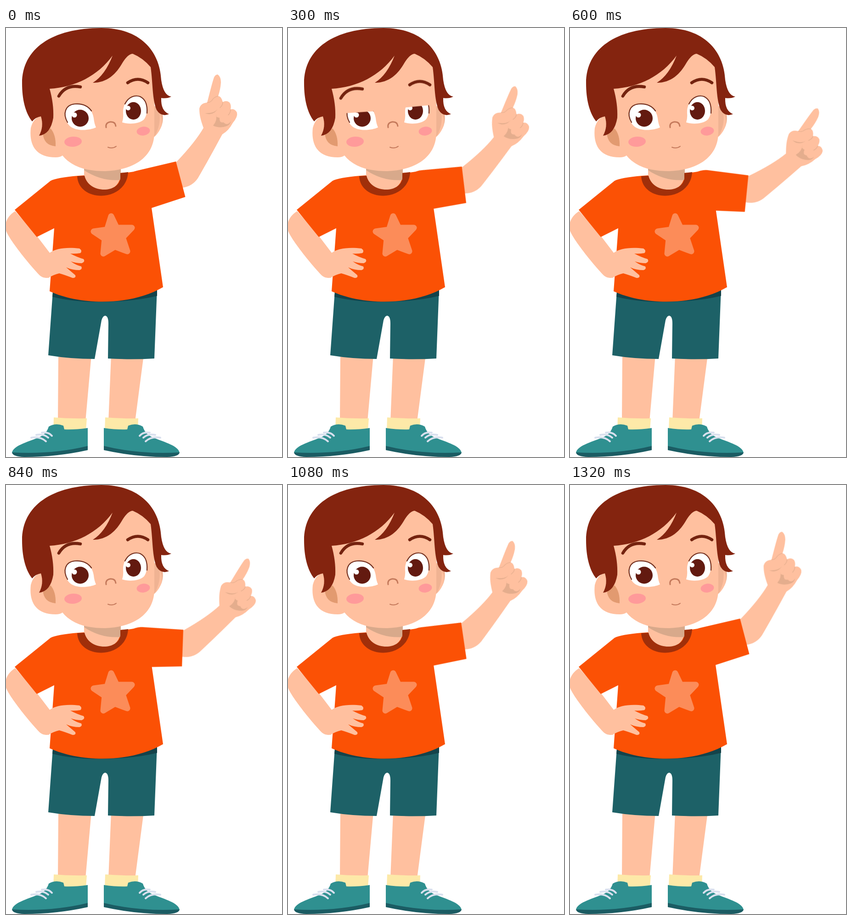
Recreate the animation shown at these times as an HTML page without scripts. Size 601 by 932 pixels, loop 1350 ms.

```html
<!DOCTYPE html>
<html lang="en">
<head>
<meta charset="utf-8">
<title>Pointing boy</title>
<style>
  html, body { margin: 0; width: 100%; height: 100%; overflow: hidden; background: #fff; }
  svg { display: block; width: 100%; height: 100%; }
  .skin { fill: #ffc09f; }
  .shade { fill: #e4ad8d; }
  .shirt { fill: #fb5105; }
  .hair { fill: #84240f; }
  .iris { fill: #631a10; }
  .white { fill: #fff; }
  .cheek { fill: #ff9a9a; }
  .line { fill: none; stroke-linecap: round; }
  .lash { stroke: #74301f; stroke-width: 2.2; }
  .brow { stroke: #74230f; stroke-width: 6.5; }
  .feature { stroke: #c4795b; }

  .arm { transform-origin: 296px 356px; animation: swing 675ms linear infinite alternate; }
  .lid { animation: blink 1350ms linear infinite; --travel: -60px; }
  .brows { animation: frown 1350ms linear infinite; }

  @keyframes swing {
    0% { transform: rotate(0deg); }
    11.1% { transform: rotate(.5deg); }
    22.2% { transform: rotate(2deg); }
    33.3% { transform: rotate(4.5deg); }
    44.4% { transform: rotate(8deg); }
    62.2% { transform: rotate(13deg); }
    75.6% { transform: rotate(17deg); }
    88.9% { transform: rotate(20.5deg); }
    94.4% { transform: rotate(21.4deg); }
    100% { transform: rotate(21.7deg); }
  }
  @keyframes blink {
    0%, 16.7%, 40%, 100% { transform: translateY(var(--travel)); }
    30.5%, 31.5% { transform: translateY(0); }
  }
  @keyframes frown {
    0%, 16.7%, 40%, 100% { transform: translateY(0); }
    30.5%, 31.5% { transform: translateY(11px); }
  }
</style>
</head>
<body>
<svg viewBox="0 0 601 932" preserveAspectRatio="none">
  <defs>
    <g id="shoe">
      <path fill="#2f9090" d="M93 866Q108 857 125 864L127 872Q150 873 178 869V912Q100 932 13 923C15 908 45 900 70 890Q88 883 93 866Z"/>
      <path fill="#1b5c63" d="M13 922Q100 927 178 908V917Q110 932 40 932Q14 931 13 922Z"/>
      <path class="line" stroke="#d9e0ee" stroke-width="4" d="M55 890Q75 887 87 898M66 884Q82 881 92 890M78 879Q93 877 100 886"/>
    </g>
  </defs>

  <!-- legs -->
  <path class="skin" d="M114 710H186L173 855H113ZM229 710H300L281 855H223Z"/>
  <path fill="#fde9a8" d="M104 846Q140 849 176 848L174 874H103ZM216 846Q252 849 288 848L287 874H215Z"/>
  <use href="#shoe"/>
  <use href="#shoe" transform="translate(391) scale(-1 1)"/>
  <path fill="#1d6167" d="M102 572L92 711Q140 719 193 719L208 635Q211 625 216 625Q223 626 223 642L222 718Q272 721 323 718L329 565Z"/>
  <path fill="#14434a" d="M102 574L101 584Q150 596 210 595Q280 594 329 582V568Z"/>

  <!-- raised arm -->
  <g class="arm">
    <path class="skin" d="M365 294L372 290Q412 248 430 217C424 200 421 190 421 175Q424 163 438 162C442 147 448 122 453 107Q456 101 461 101Q468 106 468 118Q467 133 462 148Q469 148 472 161Q480 156 487 162Q491 168 489 177Q498 174 503 184Q505 193 494 206Q485 223 471 231C453 264 435 297 418 326Q406 344 384 347Z"/>
    <path class="shade" d="M457 188Q461 200 451 212Q465 219 481 213Q488 210 490 202Q482 214 474 205Q464 207 465 195Q456 194 457 188ZM433 185Q450 192 461 176Q453 186 433 185Z"/>
    <path class="line" stroke="#e4ad8d" stroke-width="1.2" d="M438 162Q446 162 450 155Q455 149 462 148M472 161Q472 168 466 173M489 177Q489 184 484 189"/>
    <path class="shirt" d="M370 290L285 310A47.5 47.5 0 0 0 252 338L280 402L317 391L390.500 367Z"/>
  </g>

  <!-- shirt and resting arm -->
  <path class="skin" d="M20 398C2 409-4 425 0 440C6 459 53 517 74 538Q83 545 94 542L104 500L62 445Z"/>
  <path class="shirt" d="M157 321Q110 325 97 332L19 395L67 454L105 435L95 572C160 602 270 605 342 563L317 391L300 309L265 314Z"/>
  <path class="skin" d="M66 453L93 490C108 478 133 476 160 479Q167 484 162 489Q150 491 140 490Q155 498 169 502Q173 508 165 511Q152 511 141 507Q152 515 164 518Q167 524 160 526Q144 526 131 520L151 537Q153 543 145 543Q127 536 116 533Q103 536 92 543L70 530Z"/>
  <path class="skin" d="M170 295H250V322Q243 353 210 353Q176 352 170 320Z"/>
  <path fill="#d8a98b" d="M170 300H250V330Q208 334 170 309Z"/>
  <path fill="#a02f0a" d="M155 322C158 380 262 380 266 313L249 315V327C244 360 180 360 171 321Z"/>
  <path fill="#fc8c59" stroke="#fc8c59" stroke-width="13" stroke-linejoin="round" d="M229 409L241 434L274 434L254 455L264 485L237 475L212 490L215 458L191 442L220 438Z"/>

  <!-- head -->
  <path fill="#f0b393" d="M318 165L340 182Q348 213 321 238Z"/>
  <path class="skin" d="M334 184Q349 211 323 237Q338 210 334 184Z"/>
  <path class="skin" d="M80 190Q60 193 54 217C50 252 63 281 108 281Q118 281 123 277C145 304 180 311 216 311C278 309 324 280 323 225V80L270 40H200L85 110Z"/>
  <path fill="#e29a70" d="M80 228Q82 255 108 257Q109 232 97 218Z"/>
  <ellipse class="cheek" cx="146" cy="247" rx="19" ry="11" transform="rotate(-4 146 247)"/>
  <ellipse class="cheek" cx="299" cy="224" rx="14.500" ry="9.500" transform="rotate(-8 299 224)"/>
  <path class="line feature" stroke-width="3" d="M218 216Q216 206 227 204Q238 203 239 213"/>
  <path class="line feature" stroke-width="2" d="M222 259Q232 263 240 257"/>

  <!-- eyes -->
  <path class="white" d="M196 216C183 222 152 226 138 212C124 197 124 172 146 165C172 160 188 176 191 196Q192 207 196 216Z"/>
  <circle class="iris" cx="161.500" cy="196" r="18.500"/>
  <circle class="white" cx="149" cy="189" r="5.500"/>
  <path class="line lash" d="M134 205C123 186 129 167 150 165Q174 163 186 180"/>
  <path class="white" d="M253 205C263 209 290 210 301 198C311 184 309 153 288 148C267 147 254 165 255 185Q256 196 253 205Z"/>
  <ellipse class="iris" cx="277.500" cy="180" rx="16.500" ry="19"/>
  <circle class="white" cx="266" cy="174" r="5"/>
  <path class="line lash" d="M259 165C267 149 281 145 292 149Q309 157 307 185"/>
  <path class="skin lid" d="M122 152H201V215.500L122 221Z"/>
  <path class="skin lid" d="M249 144H311V203L249 209Z"/>

  <path class="hair" d="M72 234Q83 214 76 192Q64 194 57 203C42 184 35 155 35 120C35 45 100 0 208 0C290 0 335 48 338 113Q343 147 360 149Q351 154 338 152Q337 180 355 187Q338 194 328 178C318 154 320 120 315 85Q298 65 276 56Q266 56 254 75C240 100 220 119 189 119Q216 102 232 60C200 104 150 129 95 132C101 153 104 175 103 195Q97 231 72 234Z"/>
  <g class="brows line brow">
    <path d="M115 148Q130 122 162 128"/>
    <path d="M265 119Q287 104 309 119"/>
  </g>
</svg>
</body>
</html>
```
